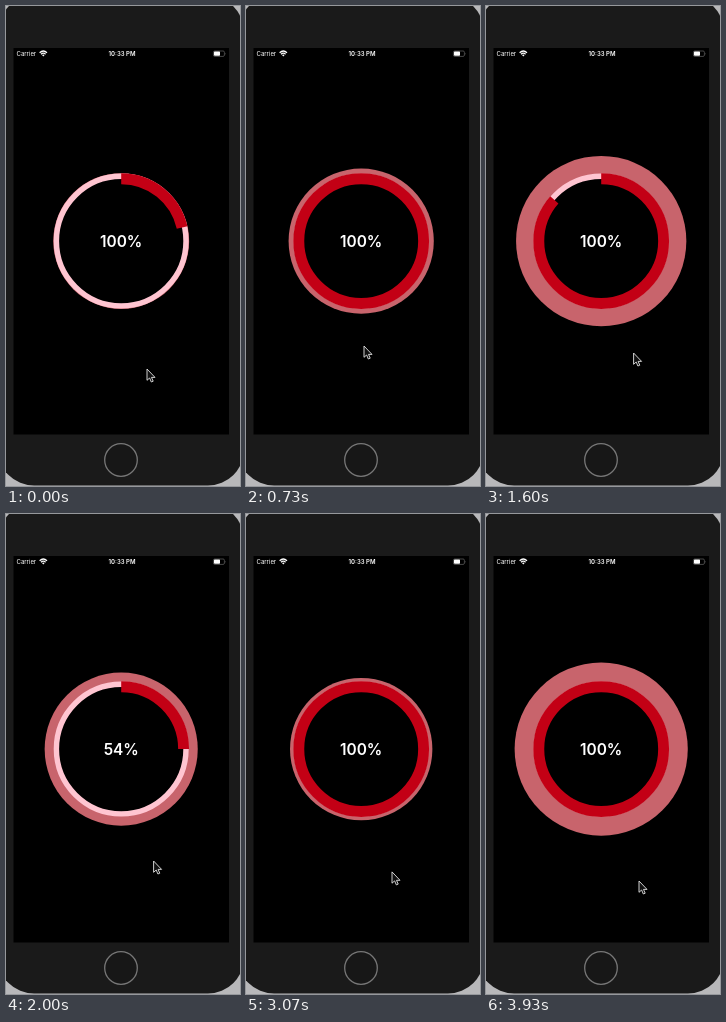
Animation of 234x480 px, one loop 3990 ms. Source, as an HTML page:

```html
<!DOCTYPE html>
<html lang="en">
<head>
<meta charset="utf-8">
<title>Download progress ring</title>
<style>
  html, body { margin: 0; width: 100%; height: 100%; overflow: hidden; background: #b8b8ba; }
  svg { display: block; width: 100%; height: 100%; }
  text { fill: #fff; font-family: Inter, sans-serif; }
  .status { font-size: 6px; }
  .bold { font-weight: 600; }
  #label { font-size: 15.4px; font-weight: 600; }
</style>
</head>
<body>
<svg viewBox="0 0 234 480">
  <!-- phone -->
  <rect x="-8" y="-10" width="246" height="489.5" rx="36" fill="#1a1a1a"/>
  <rect x="7.5" y="42" width="215.5" height="386.5"/>
  <circle cx="115" cy="454" r="16.3" fill="#171717" stroke="#777" stroke-width="1.3"/>

  <!-- status bar -->
  <text class="status" x="10.5" y="50">Carrier</text>
  <g fill="none" stroke="#fff" stroke-width="1.2">
    <path d="M33.6 46.7Q37.3 43.3 41 46.7M35 48.2Q37.3 46.2 39.6 48.2"/>
  </g>
  <path d="M36 49.1Q37.3 48.1 38.6 49.1L37.3 50.5Z" fill="#fff"/>
  <text class="status bold" x="116" y="50" text-anchor="middle">10:33 PM</text>
  <rect x="207.4" y="45" width="11" height="5.4" rx="1.3" fill="none" stroke="#777" stroke-width=".6"/>
  <rect x="208" y="45.6" width="6" height="4.2" rx=".7" fill="#fff"/>
  <path d="M219.2 46.7q.9 1 0 2z" fill="#777"/>

  <!-- progress ring -->
  <g transform="translate(115.2 235.1)">
    <circle id="pulse" fill="#c8646c"/>
    <circle r="64.8" stroke="#ffc5d1" stroke-width="5.4"/>
    <circle id="ring" r="62.4" pathLength="100" transform="rotate(-90)"
            fill="none" stroke="#c30015" stroke-width="10.9"/>
    <text id="label" y="5.7" text-anchor="middle">100%</text>
  </g>

  <path id="cursor" d="M0 0V11.3L2.6 9L4.3 13L6.2 12.2L4.5 8.4H8Z"
        fill="#111" stroke="#e4e4e4" stroke-width=".9" stroke-linejoin="round"/>
</svg>
<script>
const LOOP = 3990, FPS = 15;
const $ = id => document.getElementById(id);
const pulse = $('pulse'), ring = $('ring'), label = $('label'), cursor = $('cursor');

const linear = u => u;
const smooth = u => u * u * (3 - 2 * u);
const easeOut = u => 1 - (1 - u) ** 2;

// Keys are [time, value, easing towards this key].
function track(keys, t) {
  const i = keys.findIndex(k => k[0] > t);
  if (i < 0) return keys[keys.length - 1][1];
  if (i === 0) return keys[0][1];
  const [t0, a] = keys[i - 1], [t1, b, ease = linear] = keys[i];
  return a + (b - a) * ease((t - t0) / (t1 - t0));
}

const progress = [
  [0, 21.5], [260, 100, easeOut],
  [1540, 100], [1800, 0, smooth], [1860, 0],
  [2000, 25], [2250, 64], [2530, 100, easeOut]
];
const percent = [[1735, 0], [2000, 54], [2240, 100]];
const cursorX = [
  [60, 141], [265, 118, smooth], [760, 118], [1090, 147.6, smooth],
  [2840, 147.6], [3080, 146, smooth], [3460, 136, smooth],
  [3670, 142, smooth], [3930, 153, smooth]
];
const cursorY = [
  [60, 363], [265, 340, smooth], [760, 340], [1090, 347, smooth],
  [2840, 347], [3080, 358, smooth], [3460, 312, smooth],
  [3670, 441, smooth], [3870, 367, smooth]
];

// Triangle wave with its crest at 1458 ms.
function pulseRadius(t) {
  const phase = (t - 1458 + 3600) % 2400;
  return 88.2 - 0.0215 * Math.abs(phase - 1200);
}

function draw(now) {
  const step = Math.floor((now % LOOP + 3.4) * FPS / 1000);
  const t = step * 1000 / FPS;
  pulse.setAttribute('r', pulseRadius(t));
  ring.setAttribute('stroke-dasharray', `${track(progress, t)} 200`);
  const loading = t >= 1735 && t < 2240;
  label.textContent = `${loading ? Math.round(track(percent, t)) : 100}%`;
  cursor.setAttribute('transform', `translate(${track(cursorX, t)} ${track(cursorY, t)})`);
}

const start = performance.now();
function tick() {
  draw(performance.now() - start);
  requestAnimationFrame(tick);
}
tick();
</script>
</body>
</html>
```
